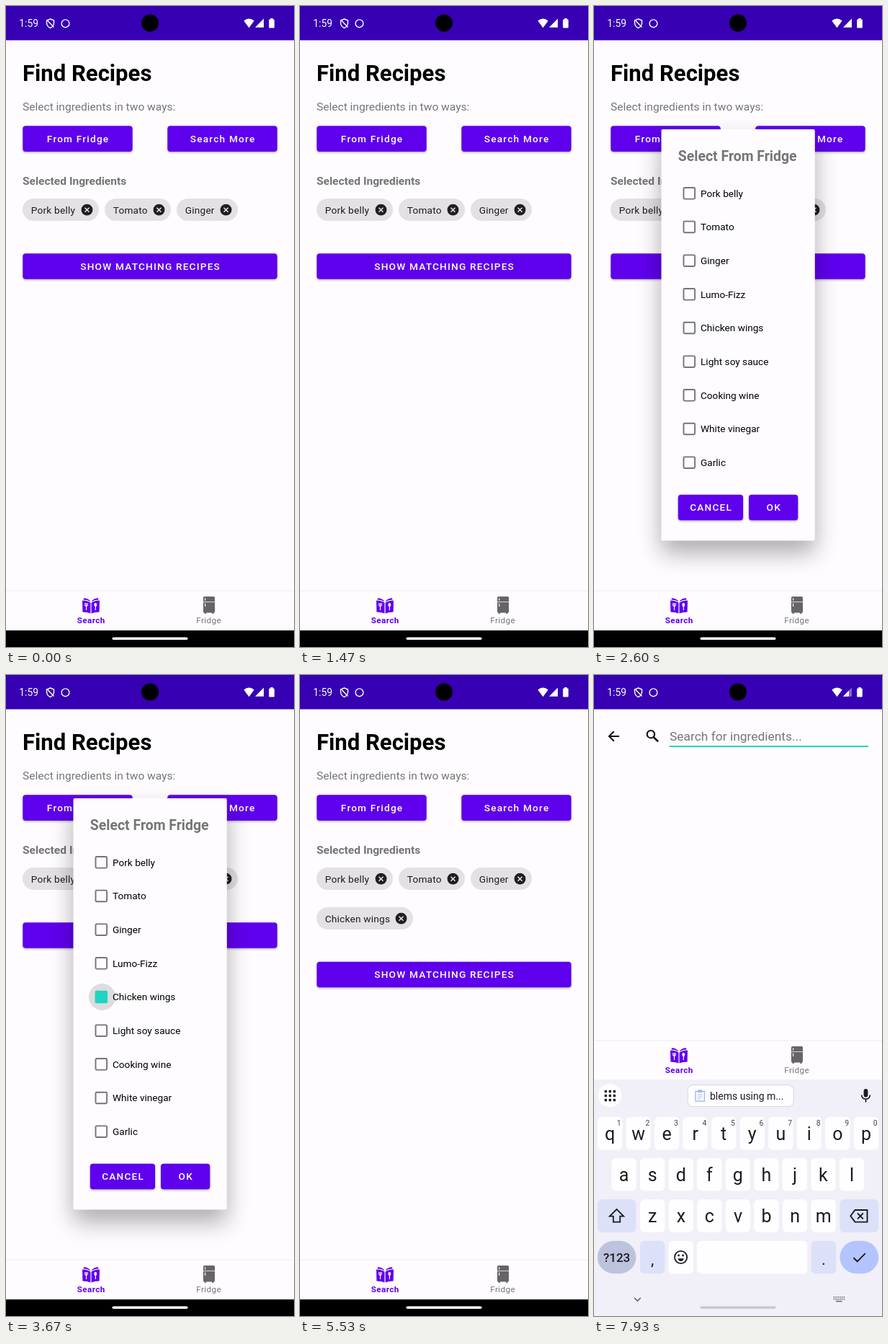
Recreate the animation shown at these times as an HTML page with a canvas. Size 400 by 889 pixels, loop 8 s.

```html
<!DOCTYPE html>
<html lang="en">
<head>
<meta charset="utf-8">
<title>Find Recipes</title>
<style>
html, body { margin: 0; width: 100%; height: 100%; overflow: hidden; background: #fefcff; }
canvas { display: block; width: 400px; height: 889px; }
</style>
</head>
<body>
<canvas id="stage"></canvas>
<script>
const W = 400, H = 889, LOOP = 8000;
const PURPLE = '#5f00ed', BAR = '#3700b3', PAGE = '#fefcff', GREY = '#757575', TEAL = '#1fd3c1', INK = '#1c1b1f';
const dpr = window.devicePixelRatio || 1;
const stage = document.getElementById('stage');
const sheet = document.createElement('canvas');
for (const c of [stage, sheet]) {
  c.width = W * dpr;
  c.height = H * dpr;
  c.getContext('2d').scale(dpr, dpr);
}
const screen = stage.getContext('2d');
let g = screen;

// Times of the user's actions, in ms
const T = { fridge: 1880, open: 1960, check: 3570, ok: 5030, close: 5110, more: 6330, search: 6460, field: 7210, keys: 7400 };

const ITEMS = ['Pork belly', 'Tomato', 'Ginger', 'Lumo-Fizz', 'Chicken wings', 'Light soy sauce', 'Cooking wine', 'White vinegar', 'Garlic'];
const CHIPS = [['Pork belly', 23, 267, 106], ['Tomato', 137, 267, 92], ['Ginger', 237, 267, 85], ['Chicken wings', 23, 322, 134]];

const clamp = v => Math.max(0, Math.min(1, v));
const ramp = (t, start, length) => clamp((t - start) / length);

function text(str, x, y, size, color = '#000', { weight = 400, gap = 0, align = 'left' } = {}) {
  g.font = `${weight} ${size}px Roboto, sans-serif`;
  g.letterSpacing = gap + 'px';
  g.textAlign = 'left';
  g.fillStyle = color;
  if (align === 'center') x -= (g.measureText(str).width - gap) / 2;
  g.fillText(str, x, y);
  g.letterSpacing = '0px';
}

function rect(x, y, w, h, r, color) {
  g.fillStyle = color;
  g.beginPath();
  g.roundRect(x, y, w, h, r);
  g.fill();
}

function disc(x, y, r, color) {
  g.fillStyle = color;
  g.beginPath();
  g.arc(x, y, r, 0, Math.PI * 2);
  g.fill();
}

function ring(x, y, r, color, width) {
  g.strokeStyle = color;
  g.lineWidth = width;
  g.beginPath();
  g.arc(x, y, r, 0, Math.PI * 2);
  g.stroke();
}

function path(d, color, width) {
  const p = new Path2D(d);
  if (width) {
    g.strokeStyle = color;
    g.lineWidth = width;
    g.stroke(p);
  } else {
    g.fillStyle = color;
    g.fill(p);
  }
}

function shadow(color, blur, dy) {
  g.shadowColor = color;
  g.shadowBlur = blur * dpr;
  g.shadowOffsetY = dy * dpr;
}

function button(label, x, y, w, h, age = -1, px = x + w / 2) {
  g.save();
  shadow('rgba(0,0,0,.28)', 3, 1.5);
  rect(x, y, w, h, 4, PURPLE);
  g.restore();
  if (age >= 0 && age < 400) {
    g.save();
    g.beginPath();
    g.roundRect(x, y, w, h, 4);
    g.clip();
    const fade = 0.24 * (1 - ramp(age, 200, 200));
    disc(px, y + h / 2, 10 + 90 * ramp(age, 0, 225), `rgba(255,255,255,${fade})`);
    g.restore();
  }
  text(label, x + w / 2, y + h / 2 + 4.9, 13.61, '#fff', { weight: 500, gap: 1.215, align: 'center' });
}

function chip([label, x, y, w]) {
  rect(x, y, w, 31, 15.5, '#e3e1e4');
  text(label, x + 11.7, y + 20.6, 13.61, INK, { gap: 0.24 });
  const cx = x + w - 16.5, cy = y + 15.7;
  disc(cx, cy, 7.9, '#1f1e21');
  path(`M${cx - 3} ${cy - 3}l6 6m0 -6l-6 6`, '#e8e6e9', 1.5);
}

function statusBar(t) {
  rect(0, 0, W, 47.5, 0, BAR);
  text('1:59', 18.3, 29, 13.8, '#fff');
  path('M61.5 18L66.5 20V24Q66 28.5 61.5 30.5Q57 28.5 56.5 24V20Z', '#fff', 1.4);
  path('M57 19.5L66.5 29.5', '#fff', 1.4);
  ring(82.5, 24.3, 5.4, '#fff', 1.4);
  disc(200, 23.5, 12, '#000');
  path('M337.5 30.2L330.3 20.6Q337.5 14.6 344.7 20.6Z', '#fff');
  if (t < T.search) path('M346 29.7L358 17.5V29.7Z', '#fff');
  else {
    path('M346 29.7L358 17.5V29.7Z', 'rgba(255,255,255,.4)');
    path('M346 29.7L354 21.6V29.7Z', '#fff');
  }
  rect(367.2, 17, 3.6, 3, 0.5, '#fff');
  rect(365.2, 18.5, 7.6, 12, 1.2, '#fff');
}

function tabs(top) {
  rect(0, top, W, 55, 0, PAGE);
  rect(0, top - 0.5, W, 1, 0, '#f0eef1');
  g.save();
  g.translate(118, top + 9);
  for (const side of [-1, 1]) {
    g.save();
    g.scale(side, 1);
    path('M1 5Q5 1 10 1.2L10.4 3.6Q5 3.6 1 6Z', PURPLE);
    path('M.6 7.4Q5 4.8 12 4.6L11.6 20.6Q5 20.6 .6 22.6Z', PURPLE);
    g.restore();
  }
  path('M-8.2 8V11.5Q-6.5 14 -4.8 11.5V8M-6.5 8V18', '#fff', 1.1);
  g.fillStyle = '#fff';
  g.beginPath();
  g.ellipse(6.3, 10.4, 1.9, 2.6, 0, 0, Math.PI * 2);
  g.fill();
  path('M6.3 11V18', '#fff', 1.2);
  g.restore();
  text('Search', 118, top + 45, 11.67, PURPLE, { weight: 700, gap: 0.39, align: 'center' });

  rect(274, top + 8, 16, 22.5, 1.5, '#666467');
  rect(274, top + 15, 16, 0.9, 0, '#e4e2e5');
  rect(276, top + 10.3, 1.2, 3.2, 0, '#f4f2f5');
  rect(276, top + 17.6, 1.2, 4.4, 0, '#f4f2f5');
  rect(275.5, top + 30, 2.6, 1.8, 0, '#666467');
  rect(286, top + 30, 2.6, 1.8, 0, '#666467');
  text('Fridge', 281.5, top + 45, 11.67, GREY, { gap: 0.39, align: 'center' });
}

function homePage(t) {
  const added = t >= T.close;
  text('Find Recipes', 23, 104, 31.1, '#000', { weight: 700 });
  text('Select ingredients in two ways:', 23, 144.7, 15.56, GREY);
  button('From Fridge', 23.3, 166.3, 152.4, 35.6, t - T.fridge, 88);
  button('Search More', 224.3, 166.3, 152.4, 35.6, t - T.more, 300);
  text('Selected Ingredients', 23, 248, 15.56, GREY, { weight: 700 });
  CHIPS.slice(0, added ? 4 : 3).forEach(chip);
  button('SHOW MATCHING RECIPES', 23.3, added ? 397.7 : 343.2, 353.4, 35.6);
}

function checkbox(x, y, t, checked) {
  if (!checked) {
    g.strokeStyle = '#757377';
    g.lineWidth = 1.9;
    g.beginPath();
    g.roundRect(x - 7.8, y - 7.8, 15.6, 15.6, 1.5);
    g.stroke();
    return;
  }
  rect(x - 8.7, y - 8.7, 17.4, 17.4, 2, TEAL);
  const k = ramp(t, T.check + 90, 130);
  if (k > 0) {
    g.save();
    g.beginPath();
    g.rect(x - 8, y - 8, 16 * k, 16);
    g.clip();
    path(`M${x - 5.6} ${y + 0.2}l3.8 3.8l7.6 -7.8`, '#fff', 1.9);
    g.restore();
  }
}

function dialog(t) {
  const enter = ramp(t, T.open, 220), leave = ramp(t, T.close, 160);
  const shown = (1 - Math.pow(1 - enter, 1.65)) * (1 - leave);
  if (shown <= 0) return;
  g = sheet.getContext('2d');
  g.clearRect(0, 0, W, H);
  g.save();
  shadow('rgba(0,0,0,.32)', 32, 17);
  rect(93.5, 171, 213.3, 570.5, 2, PAGE);
  g.restore();
  text('Select From Fridge', 116.8, 215.3, 19.45, GREY, { weight: 700 });
  const age = t - T.check;
  ITEMS.forEach((name, i) => {
    const y = 259.8 + 46.67 * i, tapped = i === 4 && age >= 0;
    if (tapped && age < 450) {
      const fade = 0.13 * (1 - ramp(age, 200, 250));
      disc(133.5, y, 8 + 10.5 * ramp(age, 0, 100), `rgba(0,0,0,${fade})`);
    }
    checkbox(132.3, y, t, tapped && age >= 40);
    text(name, 148, y + 5, 13.61, '#000');
  });
  button('CANCEL', 116.8, 677.8, 90.3, 35.4);
  button('OK', 215, 677.8, 68.3, 35.4, t - T.ok);
  g = screen;
  g.save();
  g.globalAlpha = shown;
  g.drawImage(sheet, 0, 20 * (1 - shown), W, H);
  g.restore();
}

function searchPage(t) {
  const focused = t >= T.field;
  path('M35 85H21M27.7 78.2L20.9 85L27.7 91.8', '#111', 2);
  ring(78.9, 82.2, 5.2, '#111', 2.1);
  path('M82.6 86L89.2 92.4', '#111', 2.5);
  text('Search for ingredients...', 105, 91, 17.4, GREY);
  if (focused) rect(104.7, 98, 276.3, 2, 0, TEAL);
  else rect(104.7, 98.5, 276.3, 1, 0, '#8d8b8f');
  if (focused && (t - T.field) % 1000 < 500) rect(104.2, 73, 2, 23, 0, TEAL);
}

function key(x, y, w, color = '#fefdff', r = 6) {
  rect(x, y, w, 45.6, r, color);
}

function keyRow(letters, first, y, digits) {
  [...letters].forEach((c, i) => {
    const x = first + 39.55 * i;
    key(x - 17.2, y, 34.4);
    text(c, x, y + 32, 25, INK, { align: 'center' });
    if (digits) text(String((i + 1) % 10), x + 12.8, y + 12.5, 10.5, '#46464c', { align: 'center' });
  });
}

function keyboard(top) {
  const SOFT = '#dce1f9';
  g.save();
  g.translate(0, top - 561);
  rect(0, 561, W, 329, 0, '#f1eff7');
  disc(22, 583.3, 16.3, '#fefdff');
  for (let i = 0; i < 9; i++) rect(14.6 + (i % 3) * 6, 575.8 + Math.floor(i / 3) * 6, 3.4, 3.4, 0.8, INK);

  rect(129.8, 568.3, 147.8, 30.8, 8, '#cfcdd6');
  rect(130.6, 569.1, 146.2, 29.2, 7, '#fefdff');
  path('M141 577.5H153.4V591H141Z', '#a9baf3', 1.5);
  rect(144, 575.3, 6.4, 4, 1, '#a9baf3');
  path('M143.8 582.3H150.6M143.8 585H150.6M143.8 587.7H148.5', '#a9baf3', 1.1);
  text('blems using m...', 161, 589, 14, INK);
  rect(374.6, 574, 5.8, 11.5, 2.9, INK);
  path('M371.6 582.5Q372 588 377.5 588T383.4 582.5M377.5 588V592.5', INK, 1.7);

  keyRow('qwertyuiop', 22, 612.8, true);
  keyRow('asdfghjkl', 41.6, 670);
  keyRow('zxcvbnm', 81.3, 727.3);
  key(4.8, 727.3, 53.6, SOFT);
  path('M31.5 741L21.8 750.6H26.8V758.6H36.2V750.6H41.2Z', INK, 1.8);
  key(341.4, 727.3, 53.8, SOFT);
  path('M362.5 742H379.5V758.6H362.5L356.3 750.3Z', INK, 1.9);
  path('M366 746.5L373.8 754.3M373.8 746.5L366 754.3', INK, 1.8);

  key(4.8, 784.7, 53.6, '#bdc3dc', 23);
  text('?123', 31.6, 814.3, 17, INK, { align: 'center', weight: 500 });
  key(64, 784.7, 34.4, SOFT);
  text(',', 81.2, 818, 22, INK, { align: 'center' });
  key(103.6, 784.7, 34.4);
  ring(120.6, 807.5, 8.6, INK, 1.8);
  disc(117.6, 805, 1.4, INK);
  disc(123.6, 805, 1.4, INK);
  path('M116.3 809.3H124.9Q123.8 813 120.6 813T116.3 809.3Z', INK);
  key(143, 784.7, 153.4);
  key(301.9, 784.7, 34.4, SOFT);
  text('.', 319, 818, 22, INK, { align: 'center' });
  key(341.4, 784.7, 53.8, '#b4c4fe', 23);
  path('M360.5 808.2L365.7 813.3L376.8 802.2', INK, 1.9);

  path('M56 863.7L60.4 868.1L64.8 863.7', '#5f5e66', 1.5);
  for (let i = 0; i < 12; i++) rect(332.6 + (i % 6) * 2.8, 862 + Math.floor(i / 6) * 2.8, 1.6, 1.6, 0, '#6a6971');
  rect(336, 867.8, 8.5, 1.6, 0, '#6a6971');
  rect(147.5, 875.5, 105, 3.6, 1.8, '#c9c7ce');
  g.restore();
}

function touch(t, start, x, y) {
  if (t < start || t > start + 110) return;
  disc(x, y, 8, 'rgba(255,255,255,.55)');
  ring(x, y, 7.8, 'rgba(110,110,150,.45)', 0.9);
}

function draw(t) {
  g = screen;
  rect(0, 0, W, H, 0, PAGE);
  const slide = 1 - Math.pow(1 - ramp(t, T.keys, 250), 3);
  const keysTop = H - 328 * slide;
  if (t < T.search) homePage(t);
  else searchPage(t);
  statusBar(t);
  rect(0, 865.5, W, 24, 0, '#000');
  rect(147.5, 875.5, 105, 3.6, 1.8, '#fff');
  tabs(Math.min(811, keysTop - 54));
  if (slide > 0) keyboard(keysTop);
  dialog(t);
  touch(t, T.fridge, 88, 185);
  touch(t, T.ok, 249, 695);
  touch(t, T.more, 300, 185);
  touch(t, T.field, 198, 95);
}

const begin = performance.now();
function frame() {
  draw((performance.now() - begin) % LOOP);
  requestAnimationFrame(frame);
}
frame();
</script>
</body>
</html>
```
